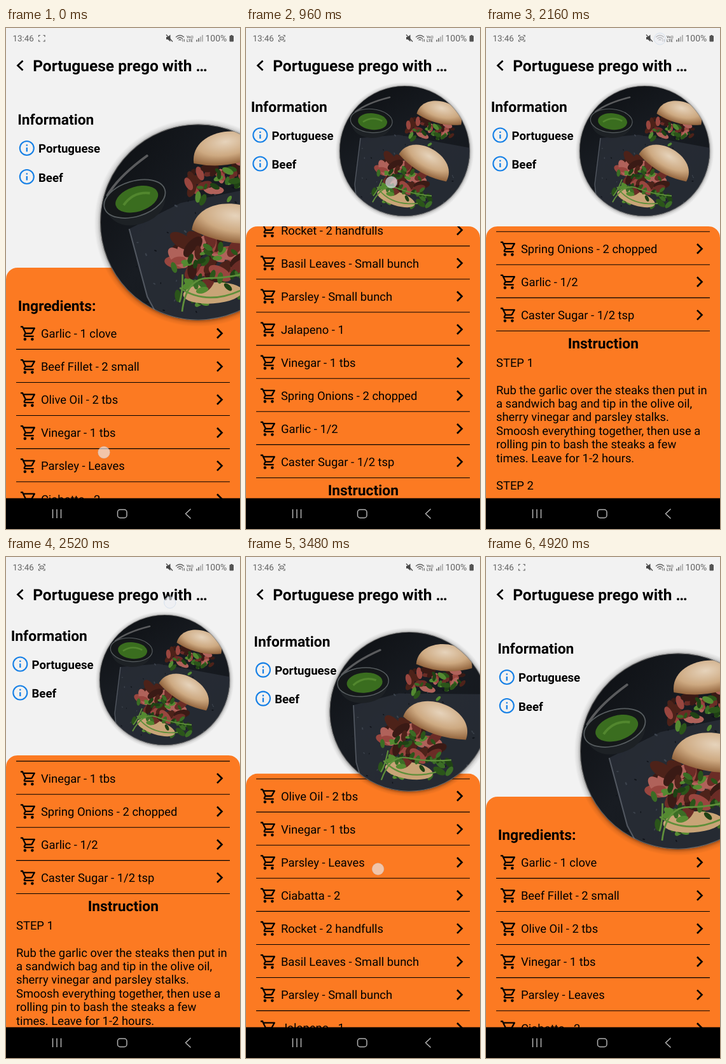
Write an HTML page that moves like this. It is 368 px wide and 788 px high and loops after 5040 ms.

```html
<!DOCTYPE html>
<html lang="en">
<head>
<meta charset="utf-8">
<title>Recipe screen</title>
<style>
  html, body { margin: 0; width: 100%; height: 100%; overflow: hidden; background: #f2f2f2; }
  svg { display: block; width: 100vw; height: 100vh; font-family: Roboto, "Noto Sans", sans-serif; }
  text { white-space: pre; text-rendering: geometricPrecision; }
  .title { font-weight: 700; font-size: 24.5px; }
  .head { font-weight: 700; font-size: 22.8px; }
  .label { font-weight: 700; font-size: 18.6px; }
  .body { font-size: 18.4px; }
  .status { fill: #626262; font-size: 13.4px; }
  .line { fill: none; stroke: #000; }
  .thin { fill: none; stroke: #626262; stroke-width: 1.2; }
  .nav { fill: none; stroke: #b4b4b4; stroke-width: 1.5; }
</style>
</head>
<body>
<svg viewBox="0 0 368 788">
  <defs>
    <clipPath id="card"><rect width="368" height="600" rx="18"/></clipPath>
    <clipPath id="round"><circle r="102.5"/></clipPath>
    <radialGradient id="shade">
      <stop offset=".94" stop-color="#000" stop-opacity=".3"/>
      <stop offset=".965" stop-color="#000" stop-opacity=".1"/>
      <stop offset="1" stop-color="#000" stop-opacity="0"/>
    </radialGradient>
    <linearGradient id="slate" x1="0" y1="0" x2=".6" y2="1">
      <stop offset="0" stop-color="#0b0d10"/>
      <stop offset=".5" stop-color="#181c22"/>
      <stop offset="1" stop-color="#13161b"/>
    </linearGradient>
    <radialGradient id="bun" cx=".5" cy=".3" r=".75">
      <stop offset="0" stop-color="#e6d3bb"/>
      <stop offset=".55" stop-color="#cda981"/>
      <stop offset="1" stop-color="#8a5a33"/>
    </radialGradient>
    <path id="cart" d="M15.55 13c.75 0 1.41-.41 1.75-1.03l3.58-6.49A1 1 0 0 0 20.01 4H5.21l-.94-2H1v2h2l3.6 7.59-1.35 2.44C4.52 15.37 5.48 17 7 17h12v-2H7l1.1-2h7.45zM6.16 6h12.15l-2.76 5H8.53L6.16 6z M7 18a2 2 0 1 0 0 4 2 2 0 0 0 0-4z M17 18a2 2 0 1 0 0 4 2 2 0 0 0 0-4z"/>
    <g id="info" fill="none" stroke="#1680e6" stroke-width="2.1">
      <circle r="11"/><path d="M0-1V5.6M0-5.8V-3.4" stroke-width="2.3"/>
    </g>
  </defs>

  <rect width="368" height="788" fill="#f2f2f2"/>

  <g id="facts">
    <text class="head" x="18.2" y="152">Information</text>
    <use href="#info" x="32.8" y="189"/>
    <text class="label" x="51" y="196">Portuguese</text>
    <use href="#info" x="32.8" y="234"/>
    <text class="label" x="51" y="241.5">Beef</text>
  </g>

  <g id="panel">
    <rect width="368" height="600" rx="18" fill="#fc7a22"/>
    <g clip-path="url(#card)"><g id="list">
      <text class="head" x="18.7" y="67.5">Ingredients:</text>
      <text class="head" x="184.3" y="832.5" text-anchor="middle">Instruction</text>
    </g></g>
  </g>

  <g id="photo">
    <circle r="109" cy=".6" fill="url(#shade)"/>
    <g clip-path="url(#round)">
      <g id="scene" transform="translate(-249.5 -193.5)">
        <rect x="140" y="85" width="220" height="220" fill="url(#slate)"/>
        <path d="M180 173L240 168 360 190V310H177L171 246Z" fill="#2b313a" opacity=".75"/>
        <path d="M180 173L171 246 177 300" fill="none" stroke="#747b84" stroke-width="1.4" opacity=".6"/>
        <path d="M172 132Q190 118 226 109" fill="none" stroke="#5a5b5d" stroke-width="2.6" stroke-linecap="round"/>
        <g transform="rotate(5 198 148)">
          <path d="M164 146Q168 173 198 173 226 172 230 147Z" fill="#1d2125"/>
          <ellipse cx="197" cy="146" rx="33" ry="18.5" fill="#15181a" stroke="#575d60" stroke-width="1.2"/>
          <ellipse cx="199" cy="147" rx="23" ry="13" fill="#3a6d1f"/>
          <path d="M184 149Q198 138 214 145" fill="none" stroke="#63993a" stroke-width="2.6" opacity=".6"/>
        </g>
      </g>
    </g>
    <circle r="102.2" fill="none" stroke="#8d8b88" stroke-width=".8" opacity=".6"/>
  </g>

  <path class="line" d="M26.5 51.5L18.5 59 26.5 66.5" stroke-width="2.8"/>
  <text class="title" x="42.2" y="68">Portuguese prego with …</text>

  <g id="statusbar">
    <text class="status" x="10.5" y="21">13:46</text>
    <path class="thin" d="M51.5 14v-2.5H54M58.5 11.5H61V14M61 18.5V21h-2.5M54 21h-2.5v-2.5"/>
    <g id="camera"><rect class="thin" x="53.5" y="14" width="5.5" height="4.6" rx="1"/><circle cx="56.2" cy="16.3" r=".8" fill="#626262"/></g>
    <path d="M252 14h2.5l4-3.5v11l-4-3.5H252Z" fill="#484848"/>
    <path d="M252 10.5L262 21.5" stroke="#484848" stroke-width="1.3"/>
    <path class="thin" d="M267 14.5Q273.5 8.5 280 14.5M269.2 17Q273.5 13 277.8 17M271.5 19.2Q273.5 17.3 275.5 19.2"/>
    <path d="M278 21.5v-4M280.5 17.5v4" stroke="#626262"/>
    <text class="status" x="284" y="15.5" style="font-size:5.6px;font-weight:700">Vo))</text>
    <text class="status" x="284" y="21.5" style="font-size:6px;font-weight:700">LTE</text>
    <path d="M300 21.5v-3M303 21.5v-5.5" stroke="#626262" stroke-width="1.6"/>
    <path d="M306 21.5v-8M309 21.5v-10.5" stroke="#a0a0a0" stroke-width="1.5"/>
    <text class="status" x="313.5" y="21" style="font-size:14px">100%</text>
    <path d="M351.5 13q0-1 1-1h1v-1H356v1h1q1 0 1 1v7.5q0 1-1 1h-4.5q-1 0-1-1Z" fill="#555"/>
  </g>

  <rect y="739.6" width="368" height="49"/>
  <path class="nav" d="M73.5 757v14M80 757v14M86.5 757v14M290.5 756.5L282.5 764 290.5 771.5"/>
  <rect class="nav" x="175.5" y="757.5" width="14.5" height="13" rx="4"/>

  <circle id="touch" r="9.2" fill="#eceef2" fill-opacity=".65" stroke="#b9cfe6" stroke-opacity=".45"/>
</svg>

<script>
const $ = id => document.getElementById(id);
const LOOP = 5040, STEP = 120, FOLD = 310;

function add(parent, tag, attrs, text) {
  const el = document.createElementNS('http://www.w3.org/2000/svg', tag);
  for (const k in attrs) el.setAttribute(k, attrs[k]);
  if (text) el.textContent = text;
  parent.append(el);
}

// Ingredient rows and instructions
const items = ['Garlic - 1 clove', 'Beef Fillet - 2 small', 'Olive Oil - 2 tbs', 'Vinegar - 1 tbs',
  'Parsley - Leaves', 'Ciabatta - 2', 'Rocket - 2 handfulls', 'Basil Leaves - Small bunch',
  'Parsley - Small bunch', 'Jalapeno - 1', 'Vinegar - 1 tbs', 'Spring Onions - 2 chopped',
  'Garlic - 1/2', 'Caster Sugar - 1/2 tsp'];
items.forEach((name, i) => {
  const y = 103.3 + i * 52.08;
  add($('list'), 'use', { href: '#cart', transform: `translate(21.8 ${y - 13.8}) scale(1.15)` });
  add($('list'), 'text', { class: 'body', x: 54.9, y: y + 6.8 }, name);
  add($('list'), 'path', { class: 'line', d: `M332 ${y - 7.5}l7.5 7.5-7.5 7.5`, 'stroke-width': 2.7 });
  add($('list'), 'path', { class: 'line', d: `M16 ${y + 25.1}H352`, 'stroke-width': 1.1 });
});
const steps = ['STEP 1', '', 'Rub the garlic over the steaks then put in', 'a sandwich bag and tip in the olive oil,',
  'sherry vinegar and parsley stalks.', 'Smoosh everything together, then use a',
  'rolling pin to bash the steaks a few', 'times. Leave for 1-2 hours.', '', 'STEP 2'];
steps.forEach((s, i) => add($('list'), 'text', { class: 'body', x: 16, y: 861.6 + i * 21.45 }, s));

// Food scene
let seed = 11;
const rnd = () => (seed = seed * 16807 % 2147483647) / 2147483647;
function scatter(n, cx, cy, w, h, tilt, size, colors) {
  const a = tilt * Math.PI / 180;
  for (let i = 0; i < n; i++) {
    const ang = rnd() * 6.283, d = Math.sqrt(rnd());
    const u = Math.cos(ang) * d * w, v = Math.sin(ang) * d * h;
    const x = cx + u * Math.cos(a) - v * Math.sin(a), y = cy + u * Math.sin(a) + v * Math.cos(a);
    const r = size * (.6 + rnd() * .7);
    add($('scene'), 'ellipse', { rx: r, ry: r * .5, fill: colors[i % colors.length],
      transform: `translate(${x} ${y}) rotate(${rnd() * 180})` });
  }
}
function bun(x, y, rx, ry, tilt) {
  add($('scene'), 'path', { fill: 'url(#bun)', transform: `translate(${x} ${y}) rotate(${tilt})`,
    d: `M${-rx} ${ry * .6}C${-rx} ${-ry * 1.5} ${rx} ${-ry * 1.5} ${rx} ${ry * .6}Q0 ${ry * 1.3} ${-rx} ${ry * .6}Z` });
}
const meat = ['#6b2c26', '#99463f', '#3a1a15', '#b0625a', '#4d2219'];
const leaf = ['#3b6d25', '#1f4214', '#548a31', '#2b551a'];
scatter(60, 250, 235, 85, 75, 0, 1.5, ['#3b424c', '#11141a']);
scatter(26, 291, 158, 40, 14, 10, 8, meat);
scatter(20, 290, 168, 42, 16, 10, 5, leaf);
bun(306, 133, 36, 18, 14);
scatter(26, 246, 266, 48, 15, 8, 7, leaf);
add($('scene'), 'ellipse', { cx: 236, cy: 268, rx: 31, ry: 11, fill: '#c8a477', transform: 'rotate(18 236 268)' });
scatter(40, 248, 233, 40, 25, 28, 11, meat);
scatter(26, 244, 243, 42, 27, 28, 5.5, leaf);
add($('scene'), 'path', { d: 'M199 274Q216 243 238 252T292 264M206 250Q226 280 270 276M214 238Q206 258 200 264',
  fill: 'none', stroke: '#5f8f3a', 'stroke-width': 1.8 });
bun(284, 209, 43, 21, 30);

// Smooth curve through [time, value] points without overshoot
function curve(pts) {
  const n = pts.length - 1;
  const rate = i => (pts[i + 1][1] - pts[i][1]) / (pts[i + 1][0] - pts[i][0]);
  const slope = i => {
    if (i === 0 || i === n) return 0;
    const a = rate(i - 1), b = rate(i);
    return a * b > 0 ? 2 * a * b / (a + b) : 0;
  };
  return t => {
    if (t >= pts[n][0]) return pts[n][1];
    let i = 0;
    while (t >= pts[i + 1][0]) i++;
    const [t0, a] = pts[i], [t1, b] = pts[i + 1], h = t1 - t0, u = (t - t0) / h, v = 1 - u;
    return v * v * ((1 + 2 * u) * a + u * h * slope(i)) + u * u * ((3 - 2 * u) * b - v * h * slope(i + 1));
  };
}
const scroll = curve([[0, 0], [120, 12], [480, 154], [1440, 602], [1800, 637], [2040, 643],
  [2160, 641], [2520, 588], [3000, 393], [3600, 125], [3960, 16.7], [4200, 0]]);
const grip = curve([[0, 667.5], [120, 653], [480, 652], [1440, 654], [2160, 658], [3000, 661], [3960, 665.5], [4200, 667]]);
const touchX = curve([[0, 154], [480, 189], [1440, 259], [2100, 274], [3000, 228], [3960, 192], [4200, 188]]);

const move = (id, x, y, more = '') => $(id).setAttribute('transform', `translate(${x} ${y}) ${more}`);
const show = (id, on) => $(id).setAttribute('visibility', on ? 'visible' : 'hidden');

function draw(t) {
  const s = scroll(t), p = Math.min(1, s / FOLD), q = 1 - p;
  move('facts', -10.5 * p, -20.5 * p);
  move('panel', 0, 377 - 65 * p);
  move('list', 0, -s);
  move('photo', 249.5 + 52.5 * q ** 2.4, 193.5 + 112 * q, `rotate(${-22 * q}) scale(${1 + .502 * q})`);
  move('touch', touchX(t), grip(t) - s);
  show('touch', t < 4320);
  show('camera', t >= 120 && t < 4560);
}

const start = performance.now();
function tick() {
  const t = (performance.now() - start) % LOOP;
  draw(Math.floor(t / STEP) * STEP);
  requestAnimationFrame(tick);
}
draw(0);
requestAnimationFrame(tick);
</script>
</body>
</html>
```
